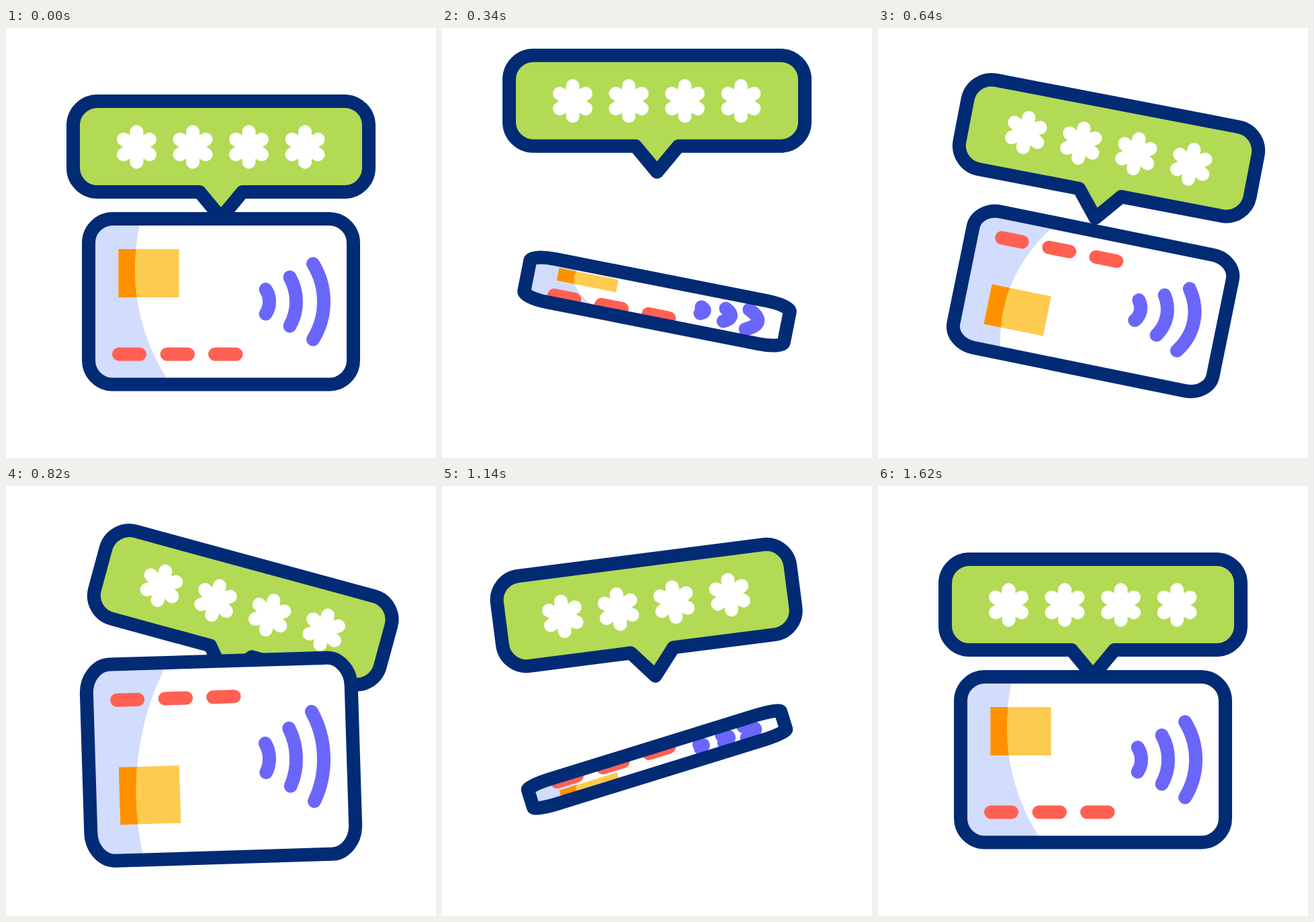
Write an HTML page that moves like this. It is 640 px wide and 640 px high and loops after 2.8 s.

```html
<!DOCTYPE html>
<html lang="en">
<head>
<meta charset="utf-8">
<title>Card PIN</title>
<style>
  @property --flip { syntax: '<number>'; inherits: false; initial-value: 1; }
  @property --tilt { syntax: '<angle>'; inherits: false; initial-value: 0deg; }
  @property --lift { syntax: '<length>'; inherits: false; initial-value: 0px; }
  @property --sway { syntax: '<angle>'; inherits: false; initial-value: 0deg; }

  html, body { margin: 0; width: 100%; height: 100%; overflow: hidden; background: #fff; }
  svg { display: block; width: 100%; height: 100%; }

  .line { fill: none; stroke-width: 20; stroke-linecap: round; stroke-linejoin: round; }
  .navy { stroke: #022b76; }
  .white { stroke: #fff; }
  .red { stroke: #ff6052; }
  .violet { stroke: #6b66fa; }

  .bubble {
    transform-origin: 320px 301px;
    transform: translateY(var(--lift)) rotate(var(--sway));
    animation: lift 2800ms cubic-bezier(.333, 0, .667, 1) infinite,
               sway 2800ms cubic-bezier(.333, .167, .667, .833) infinite;
  }
  /* Geometry is squashed by the flip while line weight stays constant */
  .card {
    transform-origin: 320px 407px;
    transform: rotate(var(--tilt)) scaleY(var(--flip));
    animation: flip 2800ms linear infinite, tilt 2800ms linear infinite;
  }
  .card .line { vector-effect: non-scaling-stroke; }

  @keyframes flip {
    0% { --flip: 1; animation-timing-function: cubic-bezier(.333, 0, .667, .8); }
    28.46% { --flip: -1.23; animation-timing-function: cubic-bezier(.333, .2, .667, 1); }
    56.93%, 100% { --flip: 1; }
  }
  @keyframes tilt {
    0% { --tilt: 0deg; animation-timing-function: cubic-bezier(.333, 0, .667, .58); }
    18.5% { --tilt: 20.6deg; }
    38.43% { --tilt: -20.6deg; animation-timing-function: cubic-bezier(.333, .42, .667, 1); }
    56.93%, 100% { --tilt: 0deg; }
  }
  @keyframes lift {
    0% { --lift: 0px; }
    14.5% { --lift: -73.3px; }
    21.86%, 100% { --lift: 0px; }
  }
  @keyframes sway {
    0% { --sway: 0deg; }
    14.29% { --sway: 0deg; animation-timing-function: cubic-bezier(.333, .36, .667, .83); }
    28.57% { --sway: 16deg; }
    42.86% { --sway: -10deg; }
    50.36% { --sway: 6.4deg; }
    57.3%, 100% { --sway: 0deg; }
  }
</style>
</head>
<body>
<svg viewBox="0 0 640 640">
  <defs>
    <path id="star" d="M0-22.5V22.5M-19.5-11.25 19.5 11.25M-19.5 11.25 19.5-11.25"/>
  </defs>

  <g class="bubble">
    <path class="line navy" style="fill:#b2da54" d="M136 109H504A36 36 0 0 1 540 145V208A36 36 0 0 1 504 244H352L320 282.5 288 244H136A36 36 0 0 1 100 208V145A36 36 0 0 1 136 109Z"/>
    <g class="line white">
      <use href="#star" x="194.5" y="177"/>
      <use href="#star" x="278" y="177"/>
      <use href="#star" x="361.5" y="177"/>
      <use href="#star" x="445" y="177"/>
    </g>
  </g>

  <g class="card">
    <rect x="123" y="284" width="394" height="246.5" rx="36" fill="#fff"/>
    <path fill="#d2dcfd" d="M201 284A305 305 0 0 0 245 530.5H159A36 36 0 0 1 123 494.5V320A36 36 0 0 1 159 284Z"/>
    <path fill="#fdcb50" d="M167.5 329H257.5V401H167.5Z"/>
    <path fill="#ff9100" d="M167.5 329H193.4A305 305 0 0 0 194.5 401H167.5Z"/>
    <path class="line red" d="M168 485.5H199M239.5 485.5H271M311 485.5H342.5"/>
    <path class="line violet" d="M386.5 389A33 33 0 0 1 386.5 425.5M422.5 371A74 74 0 0 1 422.5 443.5M457 351A107 107 0 0 1 457 463.5"/>
    <rect class="line navy" x="123" y="284" width="394" height="246.5" rx="36"/>
  </g>
</svg>
</body>
</html>
```
